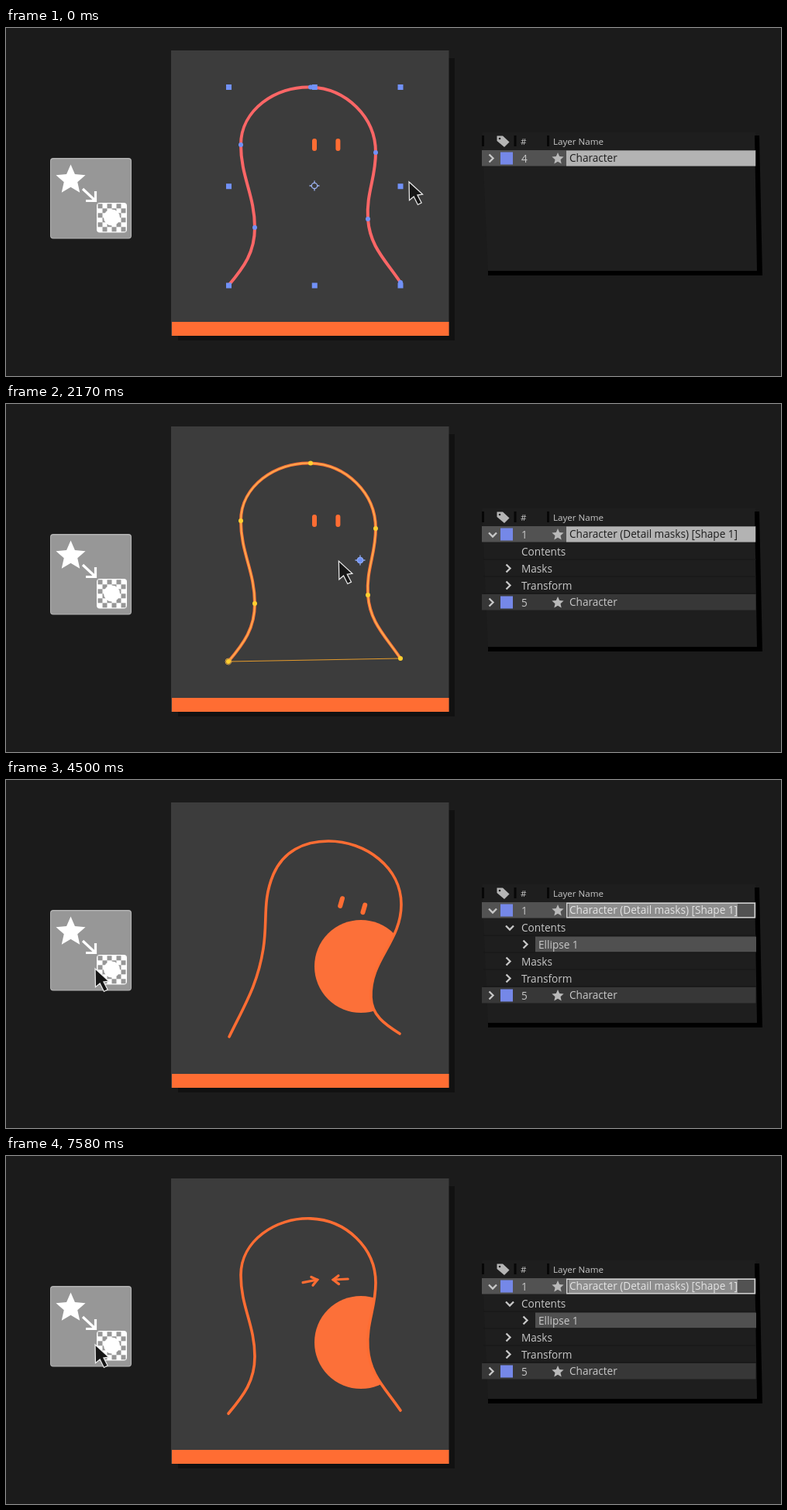
These frames come from a looping animation (1000x450 px, 7.67 s). An HTML page with a canvas:

```html
<!DOCTYPE html>
<html lang="en">
<head>
<meta charset="utf-8">
<title>Detail mask demo</title>
<style>
html, body { margin: 0; width: 100%; height: 100%; overflow: hidden; background: #1b1b1b; }
canvas { display: block; }
</style>
</head>
<body>
<canvas id="stage" width="1000" height="450"></canvas>
<script>
const g = document.getElementById('stage').getContext('2d');
const LOOP = 7670, ORANGE = '#ff6d33', BLUE = '#7191f7', WHITE = '#fff', LABEL = '#c8c8c8';
const PRESS = 1290, RELEASE = 1460, UNFOLD = 2000, DRAW = 2580, DRAWN = 3500, DONE = 3720;
const PERIOD = 1080, LEAN_AT = 4500, RAD = Math.PI / 180;

// Key points of the body: x, y and direction of travel in degrees
const upright = [[287, 333, -50], [321, 258, -90], [303, 151, -90], [393, 76.5, 2],
  [477, 161, 90], [467, 247, 86], [509, 329, 56]];
const leaning = [[288, 332, -64], [332, 218, -81], [345, 122, -67], [416, 79, 0],
  [510, 161, 90], [471, 281, 88], [508, 328, 32]];

// Pointer rests: arrival, departure, x, y
const rests = [[0, 170, 520, 199], [1310, RELEASE, 115, 244], [2190, 2190, 430, 203],
  [2500, DRAW, 398, 181], [DRAWN, 3680, 514, 298], [4330, LOOP, 610, 349]];

const smooth = (a, b, t) => { const u = Math.max(0, Math.min(1, (t - a) / (b - a))); return u * u * (3 - 2 * u); };
const mix = (a, b, u) => a + (b - a) * u;
const pressed = t => smooth(PRESS - 60, PRESS, t) * (1 - smooth(RELEASE, RELEASE + 120, t));

function pointer(t) {
  const i = Math.max(1, rests.findIndex(r => t <= r[0]));
  const [, leave, x, y] = rests[i - 1], [arrive, , nextX, nextY] = rests[i];
  if (t > arrive) return [nextX, nextY];
  const u = smooth(leave, arrive, t);
  return [mix(x, nextX, u), mix(y, nextY, u)];
}

function rect(x, y, w, h, color) { g.fillStyle = color; g.fillRect(x, y, w, h); }

function box(x, y, w, h, r, color) {
  g.beginPath(); g.roundRect(x, y, w, h, r);
  g.fillStyle = color; g.fill();
}

function stroke(color, width) { g.strokeStyle = color; g.lineWidth = width; g.stroke(); }

function disc(x, y, r, color) {
  g.beginPath(); g.arc(x, y, r, 0, 7);
  g.fillStyle = color; g.fill();
}

function ring(x, y, r, color, width = 1) {
  g.beginPath(); g.arc(x, y, r, 0, 7);
  stroke(color, width);
}

function trace(p) {
  g.beginPath();
  for (let i = 0; i < p.length; i += 2) g.lineTo(p[i], p[i + 1]);
}

function line(p, color, width) { trace(p); stroke(color, width); }

function poly(p, color) { trace(p); g.closePath(); g.fillStyle = color; g.fill(); }

function text(s, x, y, color, size = 13.6) {
  g.font = `500 ${size}px "Open Sans", "Noto Sans", sans-serif`;
  g.fillStyle = color; g.fillText(s, x, y);
}

function star(x, y, r, color) {
  const p = [];
  for (let i = 0; i < 10; i++) {
    const a = i * 36 * RAD, d = i % 2 ? r * 0.46 : r;
    p.push(x + d * Math.sin(a), y - d * Math.cos(a));
  }
  poly(p, color);
}

function chevron(x, y, open) {
  line(open ? [x - 5, y - 2, x, y + 3, x + 5, y - 2] : [x - 2.5, y - 5, x + 2.5, y, x - 2.5, y + 5], LABEL, 2.3);
}

// Smooth curve through the key points; handles are a share of each chord
function outline(p) {
  g.beginPath(); g.moveTo(p[0][0], p[0][1]);
  for (let i = 1; i < p.length; i++) {
    const [x, y, a] = p[i - 1], [X, Y, A] = p[i];
    const h = 0.385 * Math.hypot(X - x, Y - y);
    g.bezierCurveTo(x + h * Math.cos(a * RAD), y + h * Math.sin(a * RAD),
      X - h * Math.cos(A * RAD), Y - h * Math.sin(A * RAD), X, Y);
  }
}

function strokeOutline(p, color, width) { outline(p); stroke(color, width); }

function anchors(p, color) { for (const [x, y] of p) disc(x, y, 3, color); }

function handles(x, y, w, h) {
  for (let i = 0; i < 9; i++)
    if (i != 4) rect(x + w * (i % 3) / 2 - 3.5, y + h * Math.floor(i / 3) / 2 - 3.5, 7, 7, BLUE);
}

function crosshair(x, y, color, fill) {
  if (fill) disc(x, y, 4, fill);
  ring(x, y, 3.7, color, 1.3);
  for (const d of [-1, 1]) {
    line([x + d * 3.5, y, x + d * 6, y], color, 1.3);
    line([x, y + d * 3.5, x, y + d * 6], color, 1.3);
  }
}

function button(t) {
  const down = pressed(t), v = Math.round(151 + 24 * down), face = `rgb(${v},${v},${v})`;
  g.save();
  g.translate(109.5, 220); g.scale(1 - 0.12 * down, 1 - 0.12 * down); g.translate(-109.5, -220);
  box(57, 168, 105, 104.5, 4, '#b4b4b4');
  box(58, 169.5, 103, 102, 3, face);
  star(83.5, 196.5, 20, WHITE);
  line([99, 208, 115, 223], WHITE, 3.2);
  line([115.5, 211, 115.5, 223.5, 103, 223.5], WHITE, 3.2);
  box(117, 226, 39, 38.5, 4, WHITE);
  for (let i = 0; i < 36; i++) {
    const col = i % 6, row = Math.floor(i / 6);
    if ((col + row) % 2 == 0) rect(118.5 + col * 6, 227.3 + row * 6, 6, 6, face);
  }
  disc(136.5, 245, 10.5, WHITE);
  g.restore();
}

function layerRow(y, num, name, { selected, open, edit }) {
  rect(614, y - 10.5, 353.5, 20.5, selected ? '#525252' : '#373737');
  chevron(open ? 628 : 626, y, open);
  rect(638, y - 8, 16, 16, '#7588e8');
  text(num, 665, y + 5, LABEL);
  star(712, y + 0.5, 8, '#b9b9b9');
  if (selected) rect(723, y - 10, 244, 20, edit ? '#cfcfcf' : '#b3b3b3');
  if (edit) {
    rect(724.5, y - 8.5, 241, 17, '#525252');
    rect(726, y - 8.5, 218, 17, '#8d8d8d');
  }
  text(name, 727, y + 4.5, edit ? '#e4e4e4' : selected ? '#1d1d1d' : LABEL);
}

function childRow(y, name, x, arrow, open) {
  rect(616, y + 10, 352, 1, '#171717');
  if (arrow) chevron(arrow, y, open);
  text(name, x, y + 5, LABEL);
}

function layers(t) {
  poly([614, 135, 967, 135, 970, 316, 622, 316], '#1e1e1e');
  poly([966, 139, 972, 139, 976, 320, 622, 320, 622, 314, 969, 314], '#000');
  for (const x of [614, 655.5, 698]) rect(x, 139, 3, 14, '#070707');
  poly([633.5, 139.5, 641, 139.5, 649.5, 147.5, 643, 154, 633.5, 146], '#b5b5b5');
  disc(637, 143, 1.3, '#1f1f1f');
  text('#', 664, 151, LABEL, 11.6);
  text('Layer Name', 706, 151, LABEL, 11.6);

  if (t < PRESS) return layerRow(168.5, '4', 'Character', { selected: true });

  const open = t >= UNFOLD, edit = t >= DRAW;
  layerRow(168.5, '1', 'Character (Detail masks) [Shape 1]', { selected: true, open, edit });
  let y = 190.5;
  const child = (...row) => { childRow(y, ...row); y += 22; };
  if (open) {
    child('Contents', 665, edit && 650, true);
    if (edit) {
      rect(683, y - 10, 285, 20, '#505050');
      child('Ellipse 1', 687, 670);
    }
    child('Masks', 665, 648);
    child('Transform', 665, 648);
  }
  layerRow(y, '5', 'Character', {});
}

// lean: 0 is upright, 1 is fully over
function pose(t) {
  if (t < LEAN_AT - 160) return { lean: 0, squint: false };
  const u = ((t - LEAN_AT) / PERIOD + 1) % 1;
  return {
    lean: 1 - smooth(0.36, 0.54, u) + smooth(0.86, 0.99, u),
    squint: t > LEAN_AT && u > 0.5 && u < 0.89
  };
}

function eyes(lean, squint) {
  g.save();
  g.translate(mix(413.2, 447.2, lean), mix(151, 162.2, lean));
  g.rotate(16 * lean * RAD);
  for (const side of [-1, 1]) {
    if (squint) {
      g.save();
      g.translate(side < 0 ? -11.5 : 9, 9);
      g.rotate(side < 0 ? -11 * RAD : -3 * RAD);
      line([side * 19, 0, 0, 0], ORANGE, 3.2);
      line([side * 7, -5, 0, 0, side * 7, 6], ORANGE, 3.2);
      g.restore();
    } else line([side * 15.2, -5, side * 15.2, 5], ORANGE, 6);
  }
  g.restore();
}

function character(t) {
  const { lean, squint } = pose(t);
  const squash = t > LEAN_AT ? 0.017 * (1 - lean) : 0;
  const body = upright.map((p, i) => {
    const [x, y, a] = p.map((v, j) => mix(v, leaning[i][j], lean));
    return [x, mix(y, 333, squash), a];
  });
  const size = 120 * smooth(DRAW, DRAWN, t), mid = size / 2;

  if (size) {
    g.save();
    outline(body); g.clip();
    disc(398 + mid, 181 + mid, mid, '#fc7039');
    g.restore();
  }

  g.lineCap = 'round';
  eyes(lean, squint);
  if (t < PRESS) {
    strokeOutline(body, '#fb6666', 4);
    anchors(body, BLUE);
    handles(287.5, 76.5, 221.5, 256.5);
    crosshair(398, 204, '#9db2f2');
  } else if (t < DONE) {
    strokeOutline(body, '#f9743a', 4);
    strokeOutline(body, '#ffad4d', 1.6);
    line([287, 333, 509, 329], '#e39a2c', 1.2);
    anchors(body, '#ffcf30');
    ring(287, 333, 4, '#e0a040');
    if (size) {
      ring(398 + mid, 181 + mid, mid, '#7778bd');
      handles(398, 181, size, size);
    }
    crosshair(457, 202, size ? '#c9a0c0' : '#8fa9f2', !size && '#6f92f5');
  } else {
    strokeOutline(body, ORANGE, 3.6);
  }
  g.lineCap = 'butt';
}

function cursor(t) {
  const k = 0.95 * (1 - 0.12 * pressed(t));
  g.save();
  g.translate(...pointer(t)); g.scale(k, k);
  trace([0, 0, 0.5, 25, 6.5, 20, 12, 31, 17, 28.5, 11.5, 18, 18.5, 17]);
  g.closePath();
  g.fillStyle = '#161616'; g.fill();
  stroke('#ececec', 1.3);
  g.restore();
}

function draw(t) {
  rect(0, 0, 1000, 450, '#1b1b1b');
  rect(222, 39, 357, 365, '#111');
  rect(213, 29, 358.5, 369, '#3c3c3c');
  rect(214, 380, 357.5, 18, ORANGE);
  button(t);
  layers(t);
  character(t);
  cursor(t);
}

const start = performance.now();
(function tick() {
  draw((performance.now() - start) % LOOP);
  requestAnimationFrame(tick);
})();
</script>
</body>
</html>
```
